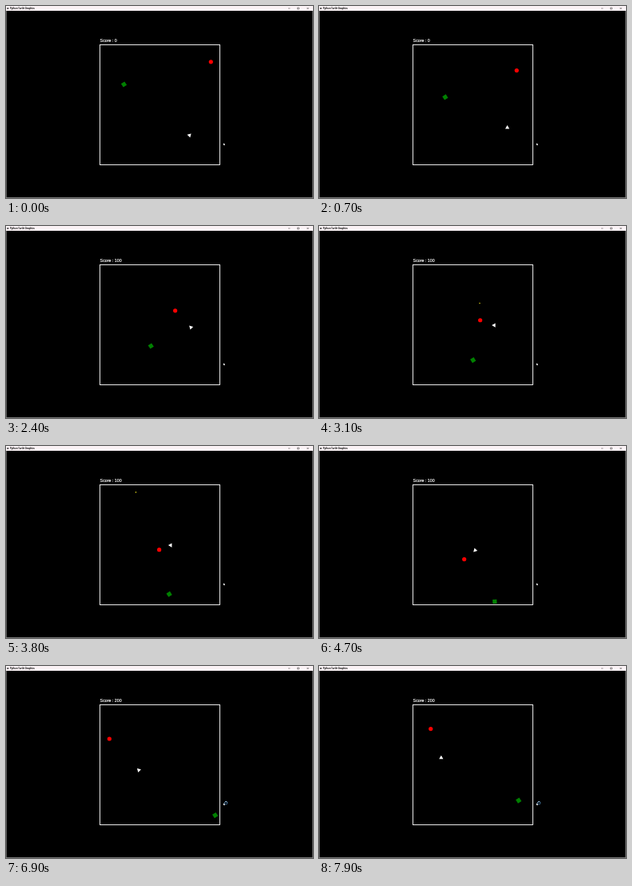
Recreate the animation shown at these times as an HTML page with a canvas. Size 384x240 px, loop 8000 ms.

```html
<!DOCTYPE html>
<html lang="en">
<head>
<meta charset="utf-8">
<title>Turtle shooter</title>
<style>
html, body { margin: 0; width: 100%; height: 100%; overflow: hidden; background: #000; }
canvas { display: block; width: 384px; height: 240px; }
</style>
</head>
<body>
<canvas id="stage"></canvas>
<script>
const W = 384, H = 240, STEPS = 80, STEP_MS = 100;
const BOX = { left: 117.5, top: 48.5, size: 150 };
const MARGIN = 3.5;
const ALLY_SPEED = 1, ENEMY_SPEED = 0.74, SHOT_SPEED = 2.6;

// The game loop runs unevenly: [seconds, ticks passed]
const pace = [[0, 0], [1.4, 38], [2.4, 62], [3.8, 104], [4.7, 125], [5.9, 155], [8, 201]];
// Player input: [seconds, heading, speed]
const steering = [
  [0, 45, 0.63], [0.5, 90, 0.63], [2, 135, 0.63], [2.6, 180, 0.63],
  [4.1, 225, 0.63], [5.7, 225, 0.95], [5.9, 135, 0.95], [7.8, 90, 0.95]
];
const firing = [0.8, 2.6, 4.8];
// Each hit scores and moves the enemy: [seconds, x, y]
const spawns = [[0, 256.3, 69.8], [1.5, 221.9, 93.6], [5, 131.6, 90]];

const canvas = document.getElementById('stage');
const ctx = canvas.getContext('2d');
const dpr = window.devicePixelRatio || 1;
canvas.width = W * dpr;
canvas.height = H * dpr;

function ticksAt(t) {
  const i = Math.max(1, pace.findIndex(p => p[0] >= t));
  const [t0, n0] = pace[i - 1], [t1, n1] = pace[i];
  return n0 + (n1 - n0) * (t - t0) / (t1 - t0);
}

function advance(body, dist) {
  const a = body.dir * Math.PI / 180;
  body.x += dist * Math.cos(a);
  body.y -= dist * Math.sin(a);
}

// Stop at the wall and turn; repeated until the heading leads away
function bounce(body, turn) {
  const { left, top, size } = BOX;
  const x = Math.min(left + size - MARGIN, Math.max(left + MARGIN, body.x));
  const y = Math.min(top + size - MARGIN, Math.max(top + MARGIN, body.y));
  if (x !== body.x || y !== body.y) body.dir += turn;
  body.x = x;
  body.y = y;
}

const inside = s => s.x > BOX.left && s.y > BOX.top &&
  s.x < BOX.left + BOX.size && s.y < BOX.top + BOX.size;

function simulate() {
  const player = { x: 229.5, y: 161.5 };
  const ally = { x: 147.5, y: 98, dir: -57 };
  const enemy = {};
  const history = [];
  let shots = [], spawned = 0, speed = 0;

  for (let i = 0; i < STEPS; i++) {
    const t = i / 10;
    const dist = i ? ticksAt(t) - ticksAt((i - 1) / 10) : 0;

    if (i) {
      advance(player, dist * speed);
      advance(ally, dist * ALLY_SPEED);
      advance(enemy, dist * ENEMY_SPEED);
      bounce(ally, 60);
      bounce(enemy, -60);
      shots.forEach(s => advance(s, dist * SHOT_SPEED));
      shots = shots.filter(inside);
    }
    if (spawned < spawns.length && t >= spawns[spawned][0]) {
      const [, x, y] = spawns[spawned++];
      Object.assign(enemy, { x, y, dir: 230 });
      shots = [];
    }
    if (firing.includes(t)) shots.push({ ...player });
    for (const [at, dir, v] of steering) {
      if (t >= at) { player.dir = dir; speed = v; }
    }

    history.push({
      t, player: { ...player }, ally: { ...ally }, enemy: { ...enemy },
      shots: shots.map(s => ({ ...s })), score: 100 * (spawned - 1)
    });
  }
  return history;
}

function text(str, x, y, size, color, family) {
  ctx.font = `${size}px ${family}`;
  ctx.fillStyle = ctx.strokeStyle = color;
  ctx.lineWidth = 0.15;
  ctx.fillText(str, x, y);
  ctx.strokeText(str, x, y);
}

function polygon(points, color) {
  ctx.fillStyle = color;
  ctx.beginPath();
  points.forEach(([x, y]) => ctx.lineTo(x, y));
  ctx.fill();
}

function regular(body, sides, radius, turn, color) {
  const points = [];
  for (let i = 0; i < sides; i++) {
    const corner = { ...body, dir: body.dir + turn + i * 360 / sides };
    advance(corner, radius);
    points.push([corner.x, corner.y]);
  }
  polygon(points, color);
}

function disc(x, y, r, color) {
  ctx.fillStyle = color;
  ctx.beginPath();
  ctx.arc(x, y, r, 0, 7);
  ctx.fill();
}

function drawWindow() {
  ctx.fillStyle = '#000';
  ctx.fillRect(0, 0, W, H);
  ctx.fillStyle = '#faf2f5';
  ctx.fillRect(0, 0, W, 6);
  ctx.fillStyle = '#8c8c8c';
  ctx.fillRect(0, 6, 0.7, H);
  ctx.fillRect(W - 0.7, 6, 0.7, H);
  ctx.fillRect(0, H - 0.8, W, 0.8);

  disc(2.3, 3, 1.1, '#333');
  text('Python Turtle Graphics', 5, 4.1, 2.9, '#222', '"Open Sans", "Liberation Sans", sans-serif');

  ctx.strokeStyle = '#333';
  ctx.lineWidth = 0.5;
  ctx.beginPath();
  ctx.moveTo(353, 3); ctx.lineTo(355.4, 3);
  ctx.rect(364.5, 2, 2, 2);
  ctx.moveTo(376.4, 1.9); ctx.lineTo(378.6, 4.1);
  ctx.moveTo(378.6, 1.9); ctx.lineTo(376.4, 4.1);
  ctx.stroke();

  ctx.strokeStyle = '#fff';
  ctx.lineWidth = 0.9;
  ctx.strokeRect(BOX.left, BOX.top, BOX.size, BOX.size);
}

function ring(from, to, color) {
  ctx.lineWidth = 0.8;
  ctx.strokeStyle = color;
  ctx.beginPath();
  ctx.arc(275.2, 171.2, 1.7, from, to);
  ctx.stroke();
}

function drawCursor(t) {
  polygon([[272, 171.2], [273.9, 173.1], [273.3, 174.2], [272, 173.7]], '#fff');
  if (t < 6.8) return;
  ring(0, 7, '#4b84b8');
  ring(t * 6, t * 6 + 2, '#b9dcf5');
}

function draw({ t, player, ally, enemy, shots, score }) {
  ctx.setTransform(dpr, 0, 0, dpr, 0, 0);
  drawWindow();
  text('Score : ' + score, 117.6, 45.2, 5.3, '#fff', '"Liberation Sans", Arial, sans-serif');
  regular(ally, 4, 3.7, 45, '#008000');
  disc(enemy.x, enemy.y, 2.6, '#f00');
  shots.forEach(s => regular(s, 3, 1.1, 0, '#f2e61c'));
  regular(player, 3, 3, 0, '#fff');
  drawCursor(t);
}

const history = simulate();

function frame() {
  draw(history[Math.floor(performance.now() / STEP_MS) % STEPS]);
  requestAnimationFrame(frame);
}
frame();
</script>
</body>
</html>
```
